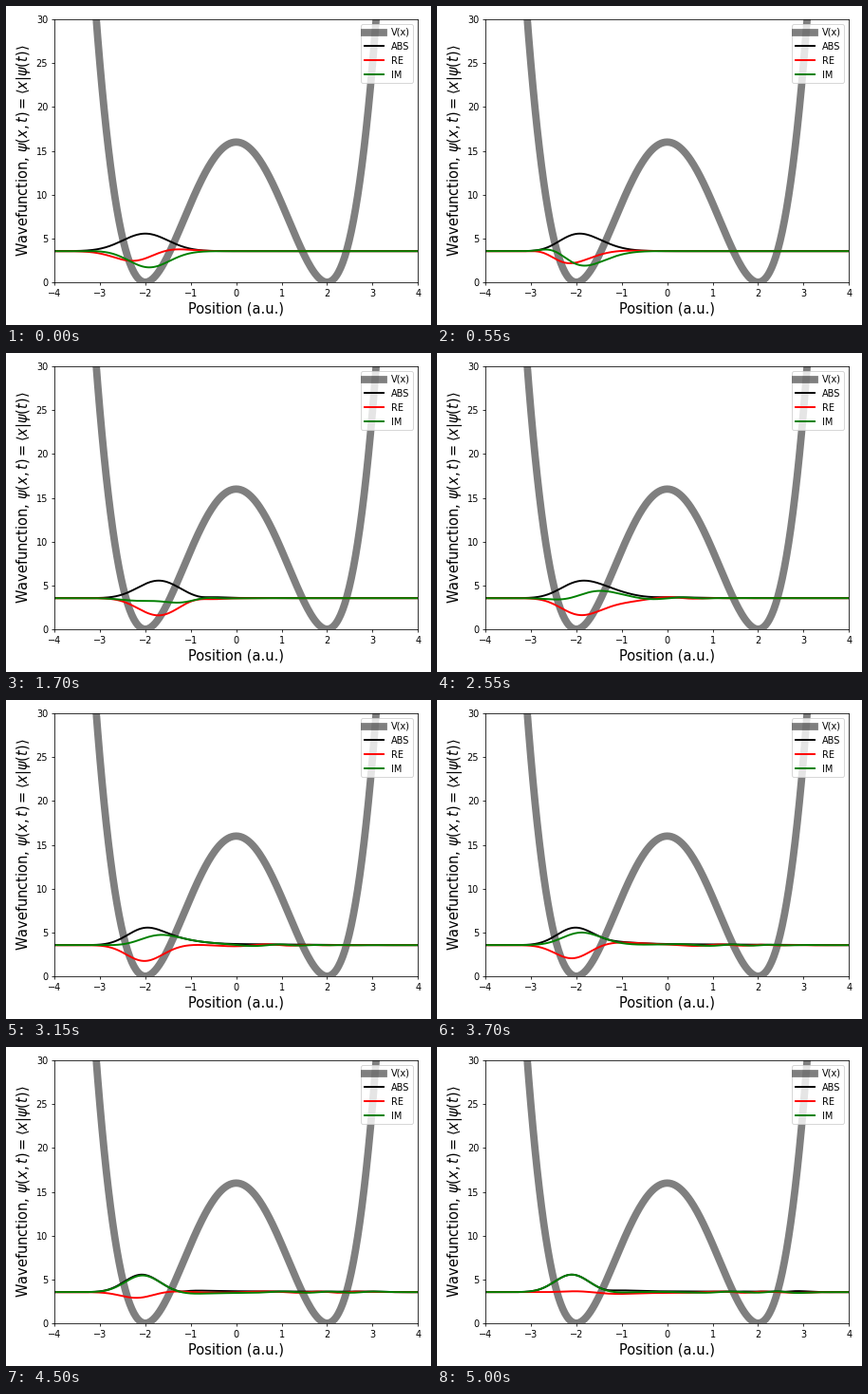
These frames come from a looping animation (448 px wide and 336 px high, 5.05 s). A matplotlib script:

```python
import numpy as np
import matplotlib.pyplot as plt
from matplotlib.animation import FuncAnimation

WIDTH, HEIGHT, DPI = 448, 336, 70
LEFT, RIGHT, TOP, BOTTOM = 51.0, 434.3, 14.2, 290.9   # axes edges, px

FRAMES = 101
DT = 0.01          # time between frames, a.u.
SUB = 10           # split-operator steps per frame
X0, P0, ALPHA = -2.0, 1.0, 4.0
ENERGY = P0**2 / 2 + ALPHA / 4 + 8 / ALPHA + 0.75 / ALPHA**2
PEAK = 2.0

x = np.linspace(-6, 6, 512, endpoint=False)
k = 2 * np.pi * np.fft.fftfreq(x.size, x[1] - x[0])


def potential(q):
    return (q**2 - 4)**2


def propagate():
    """Wave packet at every frame time, scaled to a fixed peak height."""
    step = DT / SUB
    half_v = np.exp(-0.5j * step * potential(x))
    kinetic = np.exp(-0.5j * step * k**2)
    psi = np.exp(-ALPHA / 2 * (x - X0)**2 + 1j * P0 * x)
    waves = []
    for _ in range(FRAMES):
        waves.append(PEAK * psi / np.abs(psi).max())
        for _ in range(SUB):
            psi = half_v * np.fft.ifft(kinetic * np.fft.fft(half_v * psi))
    return waves


waves = propagate()

fig, ax = plt.subplots(figsize=(WIDTH / DPI, HEIGHT / DPI), dpi=DPI)
fig.subplots_adjust(left=LEFT / WIDTH, right=RIGHT / WIDTH,
                    top=1 - TOP / HEIGHT, bottom=1 - BOTTOM / HEIGHT)
ax.plot(x, potential(x), color="black", alpha=0.5, lw=8, label="V(x)")
curves = [
    (ax.plot([], [], color=color, lw=2, label=label)[0], part)
    for label, color, part in (
        ("ABS", "black", np.abs),
        ("RE", "red", np.real),
        ("IM", "green", np.imag),
    )
]
ax.set_xlim(-4, 4)
ax.set_ylim(0, 30)
ax.set_xlabel("Position (a.u.)", fontsize=15)
ax.set_ylabel(r"Wavefunction, $\psi(x,t)=\langle x|\psi(t) \rangle$",
              fontsize=15, labelpad=2.6)
ax.legend(loc="upper right")


def update(frame):
    for line, part in curves:
        line.set_data(x, part(waves[frame]) + ENERGY)
    return [line for line, _ in curves]


anim = FuncAnimation(fig, update, frames=FRAMES, interval=50, repeat=True)
plt.show()
```
